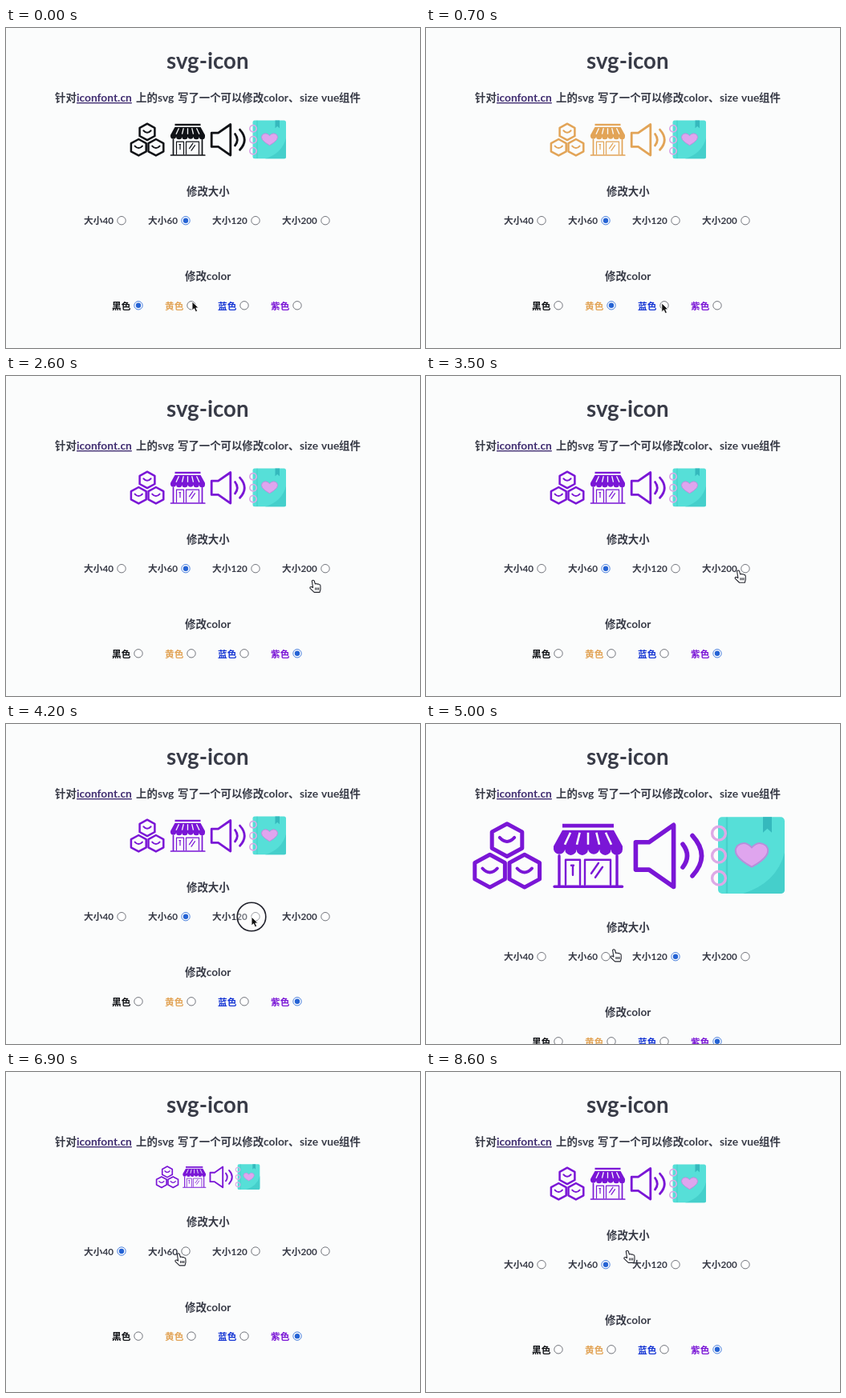
Recreate the animation shown at these times as an HTML page. Size 516 by 400 pixels, loop 8.7 s.

```html
<!DOCTYPE html>
<html lang="zh">
<head>
<meta charset="utf-8">
<title>svg-icon</title>
<style>
html, body { margin: 0; width: 100%; height: 100%; overflow: hidden; background: #fbfcfc; }
svg { display: block; }
text { font-family: Lato, "Noto Sans CJK SC", "Noto Sans CJK", sans-serif; font-weight: 700; fill: #383b47; white-space: pre; }
.line { fill: none; stroke: currentColor; stroke-linejoin: round; stroke-linecap: round; }
</style>
</head>
<body>
<svg id="stage" width="516" height="400" viewBox="0 0 516 400">
  <defs>
    <g id="hex" class="line" stroke-width="2.5">
      <path d="M0-10.2 9.4-5.1V5.1L0 10.2-9.4 5.1V-5.1Z"/>
      <path d="M-4.6-1.6Q0 3.4 4.6-1.6" stroke-width="2"/>
    </g>
    <g id="icon0">
      <use href="#hex" x="25" y="15.2"/>
      <use href="#hex" x="14.3" y="34.5"/>
      <use href="#hex" x="35.9" y="34.5"/>
    </g>
    <g id="icon1" fill="currentColor">
      <path d="M9.5 5H41.5V7.4H9.5ZM9.5 9H41.5L47 19V21A3.6 3.6 0 0 1 39.8 21 3.6 3.6 0 0 1 32.6 21 3.6 3.6 0 0 1 25.5 21 3.6 3.6 0 0 1 18.3 21 3.6 3.6 0 0 1 11.1 21 3.6 3.6 0 0 1 4 21V19Z"/>
      <path d="M14.5 10.5 11 18M20.3 10.5 18.5 18M25.5 10.5V18M30.7 10.5 32.5 18M36.5 10.5 40 18" stroke="#fbfcfc" stroke-width="1.3"/>
      <path class="line" stroke-width="1.7" d="M7.5 25V43.5M43.5 25V43.5M4.5 44.3H46.8"/>
      <path class="line" stroke-width="1.2" d="M11.5 43V27.5H20.5V43M23.5 43V27.5H39.5V43M27.5 36 32 29.5M30 38.5 34.5 32M16 31V37M15 31H16.5"/>
    </g>
    <g id="icon2" class="line" stroke-width="2.8">
      <path d="M5.2 16.5H13.5L28.8 5.8V44.4L13.5 33.7H5.2Z"/>
      <path d="M34.5 17.8Q40 25 34.5 32.2M40.5 12.4Q52 25 40.5 37.6"/>
    </g>
    <g id="icon3">
      <rect x="6.5" y=".8" width="41.5" height="47.8" rx="2.5" fill="#56dfd8"/>
      <path d="M48 23Q43 42 22 48.6H45.5Q48 48.6 48 46Z" fill="#45cfcb"/>
      <path d="M12 1V48.4" stroke="#48d0ca" stroke-width="1.2"/>
      <path d="M34.5.8H40V10.5L37.2 8 34.5 10.5Z" fill="#35b9bd"/>
      <g fill="none" stroke="#dda9e6" stroke-width="1.7">
        <circle cx="7" cy="11" r="4.2"/><circle cx="7" cy="25" r="4.2"/><circle cx="7" cy="39" r="4.2"/>
      </g>
      <path d="M27.5 32Q14 24.5 18.5 18.8 23 15 27.5 19.8 32 15 36.5 18.8 41 24.5 27.5 32Z" fill="#dfa5ee" stroke="#b78fdb"/>
    </g>
  </defs>
  <g id="head"></g>
  <g id="icons">
    <use href="#icon0"/><use href="#icon1" x="50"/><use href="#icon2" x="100"/><use href="#icon3" x="150"/>
  </g>
  <g id="form"></g>
  <circle id="ring" r="17.8" fill="#fff" fill-opacity=".3" stroke="#20212b" stroke-width="1.6"/>
  <g id="cursor">
    <path id="arrow" d="M0 0V11L2.6 8.7 4.4 12.8 6.6 11.8 4.8 7.9H8.2Z" fill="#111" stroke="#fff" stroke-width=".9"/>
    <path id="hand" d="M-1.7 1.2Q-.2-.7 1.2 1L2.4 5Q4 3.9 4.9 5.2 6.6 4.4 7.2 5.8 8.7 5.3 8.9 7.2L9 11.5 8 15.4H1.2L-4 10.3Q-4.6 8.3-2.2 8.6L-.4 9.6ZM2.7 9.5V12.5M4.7 9.5V12.5M6.7 9.5V12.5" fill="#fff" stroke="#25272f" stroke-width="1.1" stroke-linejoin="round"/>
  </g>
</svg>
<script>
const $ = id => document.getElementById(id);
const LOOP = 8700;
const text = (x, y, str, size, attrs = '') =>
  `<text x="${x}" y="${y}" font-size="${size}" ${attrs}>${str}</text>`;

$('head').innerHTML = text(200, 50.5, 'svg-icon', 27.6) + [
  [61, '针对', 13.4],
  [88, 'iconfont.cn', 13.8, 'style="fill:#3f2c70" text-decoration="underline"'],
  [162, '上的', 13.4], [189, 'svg', 13.8],
  [214, '写了一个可以修改', 13.4], [321, 'color', 13.8], [352, '、', 13.4],
  [366, 'size', 13.8], [393, 'vue', 13.8], [415, '组件', 13.4]
].map(([x, str, size, attrs]) => text(x, 92, str, size, attrs)).join('');

// value, label, label x, radio x
const sizes = [[40, '大小40', 97, 144], [60, '大小60', 177, 224], [120, '大小120', 257, 311], [200, '大小200', 344, 398]];
const colors = [['#101216', '黑色', 132, 165], ['#e2a457', '黄色', 198, 231], ['#1636d4', '蓝色', 264, 297], ['#7a16d6', '紫色', 330, 363]];
const rows = [{ items: sizes, y: 240.7 }, { items: colors, y: 346.8 }];

const radio = (x, y) => `<g class="radio" transform="translate(${x} ${y})">
  <circle r="5.2" fill="#fff"/><circle class="dot" r="3.2" fill="#2563d4"/></g>`;
$('form').innerHTML = text(225, 209, '修改大小', 13.4) + text(223, 315.3, '修改<tspan font-size="13.6">color</tspan>', 13.4) +
  rows.map(({ items, y }) => items.map(([value, label, x, cx]) =>
    text(x, y + 4.7, label, 11.7, items === colors ? `style="fill:${value}"` : '') + radio(cx, y)).join('')).join('');
const radios = [...document.querySelectorAll('.radio')];

// time, x, y of the pointer tip
const path = [
  [0, 232, 342], [300, 232, 342], [750, 296, 344], [1200, 296, 344], [1400, 337, 345], [1800, 360, 348],
  [2300, 360, 348], [2600, 383, 255], [2900, 396, 243], [3400, 396, 243], [4000, 306, 241], [4400, 306, 241],
  [5200, 221, 289], [5500, 221, 289], [5700, 219, 287], [6150, 143, 242], [6600, 143, 242], [6900, 215, 226.5],
  [7100, 223, 224], [7450, 223, 224], [7700, 251, 223], [LOOP, 251, 223]
];
// ring start, click time, row, chosen item
const clicks = [
  [100, 200, 1, 1], [800, 1000, 1, 2], [1900, 2100, 1, 3], [4100, 4300, 0, 2],
  [5300, 5500, 0, 1], [6200, 6300, 0, 0], [7100, 7300, 0, 1]
];

function pointer(t) {
  const i = path.findIndex(p => p[0] > t);
  const [a, b] = [path[i - 1], path[i]];
  const u = (t - a[0]) / (b[0] - a[0]), e = u * u * (3 - 2 * u);
  return [a[1] + (b[1] - a[1]) * e, a[2] + (b[2] - a[2]) * e];
}

// Labels show a hand; radios and empty space show an arrow.
function isHand(x, y, shift) {
  return rows.some(({ items, y: rowY }) => {
    const dy = y - rowY - shift;
    return Math.abs(dy) < 20 && x > items[0][2] - 13 && x < items[3][3] + 19 &&
      items.every(item => Math.hypot(x - item[3], dy) > 8);
  });
}

function draw(t) {
  const chosen = [1, 0];
  for (const [, at, row, item] of clicks) if (t >= at) chosen[row] = item;
  const cell = sizes[chosen[0]][0] * 5 / 6, shift = cell - 50;
  $('icons').setAttribute('transform', `translate(${251 - 2 * cell} 114.7) scale(${cell / 50})`);
  $('icons').style.color = colors[chosen[1]][0];
  $('form').setAttribute('transform', `translate(0 ${shift})`);

  radios.forEach((el, i) => {
    const on = chosen[i >> 2] === i % 4;
    el.firstElementChild.setAttribute('stroke', on ? '#4a80dd' : '#73767d');
    el.lastElementChild.setAttribute('visibility', on ? 'visible' : 'hidden');
  });

  const [x, y] = pointer(t), hand = isHand(x, y, shift);
  const place = `translate(${x} ${y})`;
  $('cursor').setAttribute('transform', place);
  $('ring').setAttribute('transform', place);
  $('ring').style.display = clicks.some(([from, to]) => t >= from && t < to) ? '' : 'none';
  $('arrow').style.display = hand ? 'none' : '';
  $('hand').style.display = hand ? '' : 'none';
}

const start = performance.now();
function tick() {
  const t = (performance.now() - start) % LOOP;
  draw(Math.floor(t / 100) * 100);
  requestAnimationFrame(tick);
}
tick();
</script>
</body>
</html>
```
